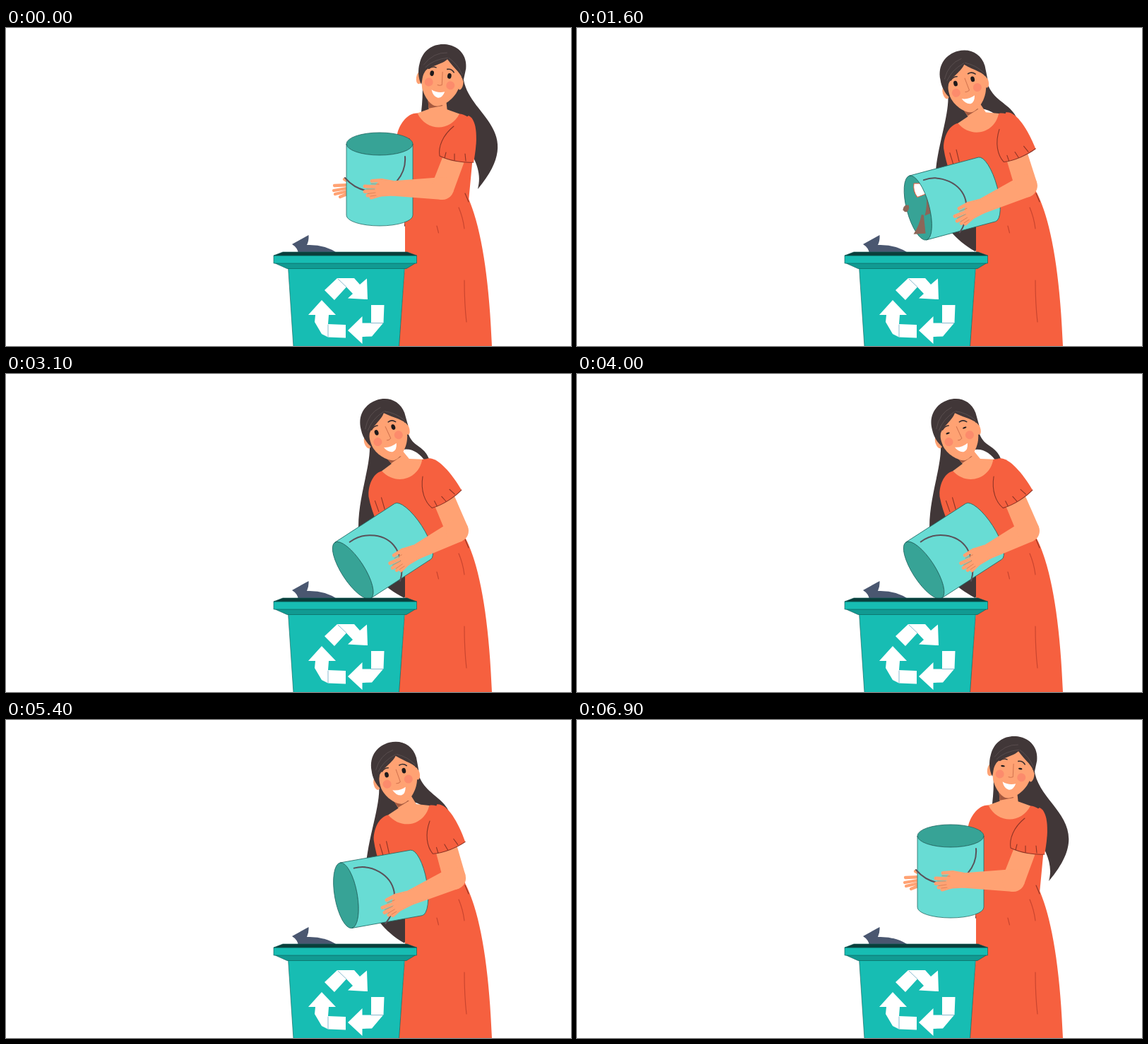
An HTML page for the animation above (7000 ms loop, 800x450 px).

```html
<!DOCTYPE html>
<html lang="en">
<head>
<meta charset="utf-8">
<title>Emptying the bucket</title>
<style>
html, body { margin: 0; width: 100%; height: 100%; overflow: hidden; background: #fff; }
svg { display: block; width: 100vw; height: 100vh; }
.line { fill: none; stroke-linecap: round; stroke-linejoin: round; }
.skin { fill: #ffa273; }
.hair { fill: #413738; }
.dress { fill: #f6603f; }
.fold { stroke: #8e3526; stroke-width: 1.1; }
</style>
</head>
<body>
<svg viewBox="0 0 800 450">
  <path id="rightLock" class="hair"/>
  <path id="leftLock" class="hair"/>
  <path fill="#4a5770" d="M405 306 L428.500 293 Q429 301 426 307 Q452 306 470 319 H414 Q413 311 405 306Z"/>
  <path id="torso" class="dress"/>
  <path class="dress" d="M565 272 V335 L556 450 H688 C684 350 672 275 651 233 L600 220Z"/>
  <path class="line" stroke="#c9452f" stroke-width="1.200" d="M641 254 Q647 268 649 284 M610 280 L612.500 290 M649 357 Q649 390 652 416"/>
  <path class="line fold" d="M650 234 L655 246"/>
  <path id="chest" class="line fold" d="M-41 36 V53 M-51 38 L-50 54"/>
  <path id="neck" class="skin"/>
  <path id="shade" fill="#a65a3f"/>
  <g id="head">
    <ellipse class="skin" cx="-29" cy="9" rx="4.500" ry="9"/>
    <ellipse class="skin" cx="29.500" cy="8" rx="4" ry="9"/>
    <path class="skin" d="M-27 -10 L-25 14 C-23 31 -9 44 -1 45 C10 45 27 30 29 10 L30 -14 L6 -30Z"/>
    <circle cx="-15" cy="13" r="6" fill="#fc8b6c"/>
    <circle cx="16" cy="13" r="6" fill="#fc8b6c"/>
    <path class="line" stroke="#d2744f" d="M2 -4 L4 14 Q1 16 -2 15"/>
    <path class="line" stroke="#3a2f30" stroke-width="1.600" d="M-18 -6 Q-13 -10.500 -8 -9 M8 -9 Q14 -11 18 -6"/>
    <g id="eyes" fill="#1f1a1b">
      <ellipse cx="-12.500" rx="2.800" ry="3.900"/>
      <ellipse cx="12.500" rx="2.800" ry="3.900"/>
    </g>
    <path fill="#fff" d="M-9.500 23 Q0 27 9.500 23 Q7 33 1 33 Q-6 32 -9.500 23Z"/>
    <path class="hair" d="M6 -23 C-2 -13 -20 -9 -23 0 C-26 6 -24 14 -25 18 C-31 10 -33 -2 -32 -10 C-31 -33 -14 -43.500 2 -43.500 C20 -43.500 33 -32 34 -14 L33 5 C30 -6 18 -11 6 -23Z"/>
    <path class="line" stroke="#65595a" stroke-width=".6" d="M6 -25 Q-13 -20 -23 -7 M4 -32 Q-15 -30 -26 -10 M8 -25 Q22 -18 30 -5"/>
  </g>
  <path id="farHand" class="line" stroke="#ffa273" stroke-width="4.300" d="M4 -8 L-5 -13 M4 -5 L-19 -4 M4 -1 L-20 3 M4 3 L-18 8 M4 6 L-11 12"/>
  <ellipse id="rim" cy="-51" rx="47" ry="16" fill="#37a396" stroke="#246b65" stroke-width=".8"/>
  <g id="litter"></g>
  <g id="pail">
    <path fill="#68dcd4" stroke="#246b65" stroke-width=".8" d="M-47 -51 A47 16 0 0 0 47 -51 V50 A47 15 0 0 1 -47 50Z"/>
    <path class="line" stroke="#59525a" stroke-width="2" d="M36 -33 C38 -8 18 17 -7 17 C-25 16 -38 10 -49 -3"/>
  </g>
  <path id="upperArm" class="skin"/>
  <path id="foreArm" class="skin"/>
  <circle id="elbow" class="skin" r="16"/>
  <g id="hand">
    <path class="skin" d="M3 -11 L-14 -14 L-22 -6 L-24 12 L3 10.500Z"/>
    <path class="line" stroke="#ffa273" stroke-width="5" d="M-14 -11.500 L-28 -10.500 M-18 -2 L-38 -3 M-18 3 L-38 4.500 M-18 6 L-34 10 M-16 9 L-29 13"/>
    <path class="line" stroke="#d97c53" stroke-width=".8" d="M-18 -6 L-29 -6.500 M-24 1 L-36 1 M-23 6 L-34 7.500 M-22 10 L-30 11"/>
  </g>
  <g id="sleeve">
    <path class="dress" d="M0 0 C-16 13 -22 29 -20 42 C-6 49 14 52 28 51 C34 21 34 -9 21 -15Z"/>
    <path class="line fold" d="M0 0 C-16 13 -22 29 -20 42 C-6 49 14 52 28 51 M-11 37 L-13 45 M1 39 V48 M16 39 L17 49"/>
  </g>
  <g stroke="#0b5a55" stroke-width=".6">
    <path fill="#17bdb3" d="M399.500 338 H564.500 L556.500 451 H407Z"/>
    <path fill="#119a92" d="M379 332 H581 L567 340.500 H398Z"/>
    <path fill="#17bdb3" d="M379 322 H581.500 V333 H379Z"/>
    <path fill="#0a3e3b" d="M392 317 H568 L581.500 322 H379Z"/>
  </g>
  <path fill="#fff" d="M451 371 L469 354 H493 L501 363 L511 354.500 L512 384 L484 382.500 L491 376 L482 366.500 L465 385Z
    M517 392 H535.500 L534.500 417 L518 436.500 L504.500 437 V447 L484 428 L504.500 408 V417.500 H517Z
    M447 385 L467 406 H457 L456 419 L481 420 V438.500 L456 437.500 L447 433 L437 416 L438 406 H428Z"/>
  <path class="line" stroke="#7bb3c9" stroke-width=".9" d="M470 355 L482 366.500 M517 417.500 H534 M456 420 V437"/>
</svg>
<script>
const LOOP = 7000, STEP = 100, TILT = 123, FALL = 700;
const $ = id => document.getElementById(id);
const clamp = u => Math.max(0, Math.min(1, u));

// How far the pail is tipped: 0 upright, 1 fully poured.
const tipped = t => 1 - (1 - clamp((t - 220) / 2920)) ** 3 - clamp((t - 3660) / 3050) ** 3;

// Travel from one value to another, bowed by sag halfway.
const glide = (k, from, to, sag = 0) => from + (to - from) * k + sag * 4 * k * (1 - k);

// A joint has a position and a rotation; at() gives a point in its local space.
const joint = (x, y, r = 0) => ({ x, y, r });
function at({ x, y, r }, dx, dy) {
  const a = r * Math.PI / 180, c = Math.cos(a), s = Math.sin(a);
  return [x + dx * c - dy * s, y + dx * s + dy * c];
}
const place = (id, { x, y, r }) => $(id).setAttribute('transform', `translate(${x} ${y}) rotate(${r})`);

function rig(k) {
  const head = joint(glide(k, 615.5, 536.5), 66 + 13 * k * k, 9 - 27.5 * k);
  const chest = joint(glide(k, 612.5, 561), glide(k, 121, 129), 1 - 17 * k);
  const sleeve = joint(glide(k, 634, 590, 3), 139 + 6 * k * k, -42 * k ** 1.5);
  const elbow = joint(glide(k, 618, 639), 227 - 5 * k * k);
  const wrist = joint(glide(k, 546, 579, -6.5), glide(k, 227, 253, 8));
  wrist.r = Math.atan2(elbow.y - wrist.y, elbow.x - wrist.x) * 180 / Math.PI;
  const farHand = joint(glide(k, 484, 530, -18), glide(k, 227, 265, 12), -20 * k);
  const pail = joint(glide(k, 529, 534, -2.4), glide(k, 215, 250, -7), -TILT * k);
  return { head, chest, sleeve, elbow, wrist, farHand, pail };
}

// Fills a path such as 'M* L* Z' with points.
function trace(id, path, ...points) {
  let i = 0;
  $(id).setAttribute('d', path.replace(/\*/g, () => points[i++].map(n => n.toFixed(2)).join(' ')));
}

function limb(id, a, b, ra, rb) {
  const d = Math.hypot(b.x - a.x, b.y - a.y), nx = (a.y - b.y) / d, ny = (b.x - a.x) / d;
  const side = (p, r) => [p.x + nx * r, p.y + ny * r];
  trace(id, 'M* L* L* L* Z', side(a, ra), side(b, rb), side(b, -rb), side(a, -ra));
}

function drawHair(k, head) {
  const crown = at(head, 0, -10), nape = at(head, -10, 40);
  const right = at(head, 32, -2), left = at(head, -26, 8);
  const rx = glide(k, 668, 605, 10), ry = glide(k, 228, 165, 15);
  trace('rightLock', 'M* C* * * C* * * L* Z', right, [right[0] + 5, right[1] + 55],
    [rx + 72 * Math.sqrt(1 - k), ry - 85], [rx, ry],
    [rx + 12 * (1 - k), ry - 40], [rx - 30, ry - 80], nape, crown);
  const lx = glide(k, 564, 564), ly = glide(k, 281, 317, 9);
  trace('leftLock', 'M* C* * * L* L* L* Z', left, [left[0] + 8, left[1] + 55],
    [lx - 114 * Math.sqrt(k), ly - 60], [lx, ly], [600, 250], at(head, 12, 60), crown);
}

function drawBody({ head, chest, sleeve, elbow, wrist }) {
  const c = (x, y) => at(chest, x, y), h = (x, y) => at(head, x, y);
  trace('torso', 'M* C* * * Q* * L* L* C* * * Z', c(-30, 0), c(-46, 0), c(-56, 19), c(-58, 30),
    c(-62, 75), [565, 280], [655, 245], c(49, 67), c(60, 29), c(50, 1), c(29.5, 0));
  trace('neck', 'M* L* L* C* * * L* L* Z', h(-14, 30), c(-14, -6), c(-30, 0),
    c(-17, 26), c(17, 26), c(29.5, 0), c(12, -6), h(12, 30));
  trace('shade', 'M* L* L* Z', h(-14, 32), c(-14, -7), h(10, 43));
  const [x, y] = at(sleeve, 0, 46);
  limb('upperArm', joint(x, y), elbow, 15.5, 16);
  limb('foreArm', wrist, elbow, 10.5, 16);
}

const kinds = [
  { d: 'M-4 -11 L10 -7 L9 8 L-5 9 Q-9 -1 -4 -11Z', fill: '#fff', stroke: '#dd5b40', x: 21, end: 456 },
  { d: 'M4 -13 L7 -12 L8 14 L-9 14 Q0 2 4 -13Z', fill: '#8c6658', stroke: 'none', x: 0, end: 480 },
  { d: 'M-5 1 Q-3 -6 4 -4 Q5 2 0 5 Q-4 5 -5 1Z', fill: '#8c6658', stroke: 'none', x: 0, end: 428 }
];
const COUNT = 9;
const litter = Array.from({ length: COUNT }, (_, i) => {
  const kind = kinds[i % kinds.length];
  const start = 700 + 1200 * Math.sqrt(i / (COUNT - 1));
  const el = document.createElementNS('http://www.w3.org/2000/svg', 'path');
  for (const name of ['d', 'fill', 'stroke']) el.setAttribute(name, kind[name]);
  $('litter').append(el);
  return { el, start, end: kind.end, from: at(rig(tipped(start)).pail, kind.x, -36) };
});

function drop({ el, start, end, from: [x, y] }, t) {
  const u = (t - start) / FALL;
  el.style.display = u < 0 || u > 1.1 ? 'none' : '';
  el.setAttribute('transform',
    `translate(${x + (end - x) * u} ${y + (335 - y) * u * u}) rotate(${30 * (u - .8)})`);
}

function draw(t) {
  const k = tipped(t), pose = rig(k);
  drawHair(k, pose.head);
  drawBody(pose);
  for (const id of ['head', 'chest', 'sleeve', 'elbow', 'farHand', 'pail']) place(id, pose[id]);
  place('hand', pose.wrist);
  place('rim', pose.pail);
  litter.forEach(item => drop(item, t));
  const gap = Math.min(Math.abs(t - 4000), Math.abs(t - 6900));
  const open = Math.min(1, .3 + gap / 200);
  $('eyes').setAttribute('transform', `translate(0 ${(1 - open) * 1.5}) scale(1 ${open})`);
}

const begin = performance.now();
function tick() {
  const t = (performance.now() - begin) % LOOP;
  draw(Math.floor(t / STEP) * STEP);
  requestAnimationFrame(tick);
}
tick();
</script>
</body>
</html>
```
